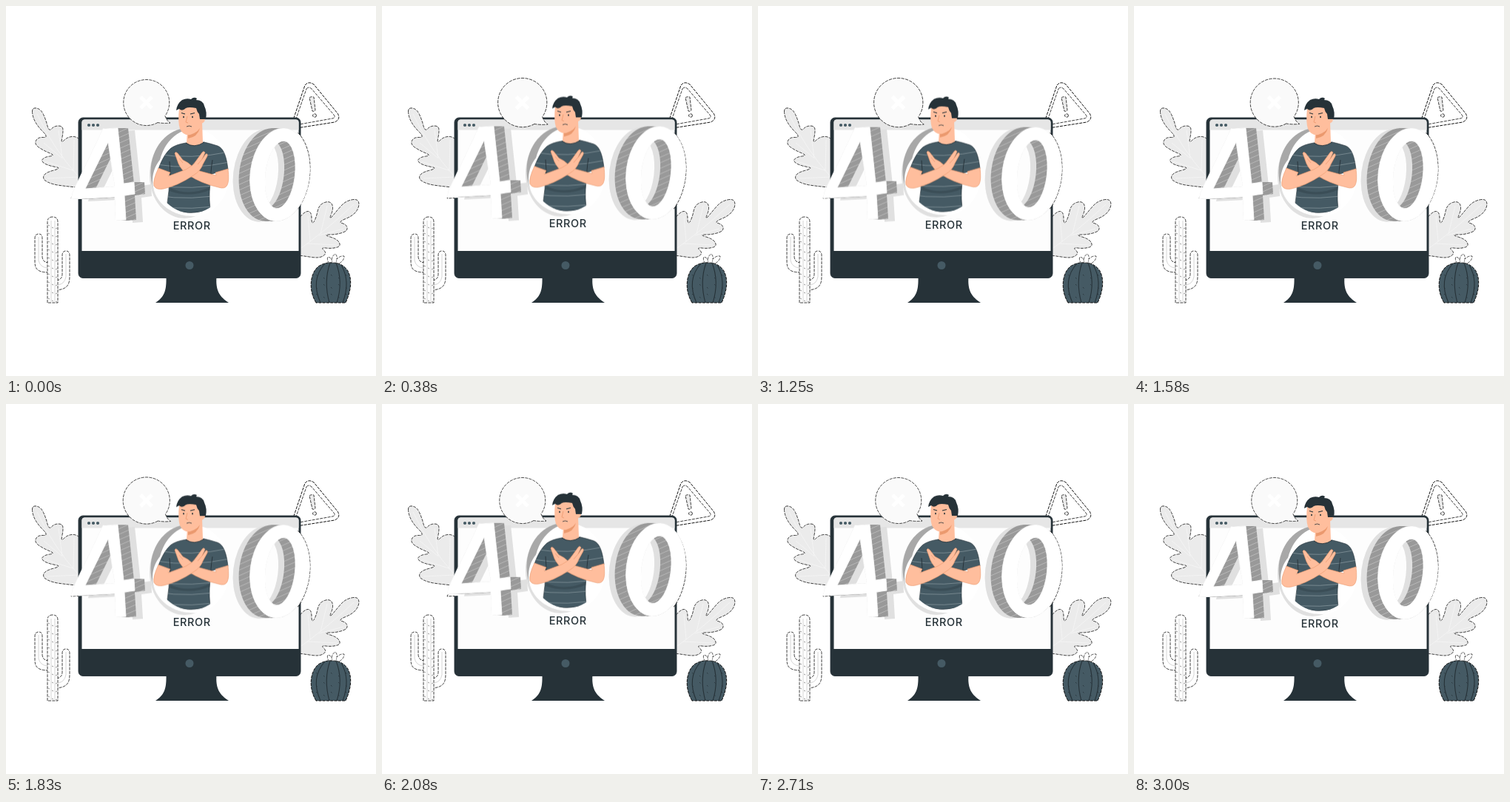
These frames come from a looping animation (500 px wide and 500 px high, 3040 ms). An HTML page with a canvas:

```html
<!DOCTYPE html>
<html lang="en">
<head>
<meta charset="utf-8">
<title>400 Error</title>
<style>
  html, body { margin: 0; width: 100%; height: 100%; overflow: hidden; background: #fff; }
  canvas { display: block; width: 500px; height: 500px; }
</style>
</head>
<body>
<canvas id="stage"></canvas>
<script>
const LOOP = 3040, SIZE = 500;
const DARK = '#263238', SLATE = '#455a64', SKIN = '#ffbe9d', SKIN_EDGE = '#eb996e';
const PALE = '#ebebeb', VEIN = '#f6f6f6', SHADE = '#e0e0e0', WALL = '#999', INK = '#111';
const ratio = Math.max(1, window.devicePixelRatio || 1);

function layer(canvas, scale) {
  canvas.width = canvas.height = SIZE * scale;
  const c = canvas.getContext('2d');
  c.scale(scale, scale);
  c.lineJoin = 'round';
  return c;
}
const ctx = layer(document.getElementById('stage'), ratio);

// Straight polygon from a flat list of coordinates
function poly(p) {
  const path = new Path2D();
  for (let i = 0; i < p.length; i += 2) path.lineTo(p[i], p[i + 1]);
  path.closePath();
  return path;
}

// Smooth closed outline passing near the given points
function blob(p) {
  const path = new Path2D(), n = p.length;
  path.moveTo((p[n - 2] + p[0]) / 2, (p[n - 1] + p[1]) / 2);
  for (let i = 0; i < n; i += 2) {
    const j = (i + 2) % n;
    path.quadraticCurveTo(p[i], p[i + 1], (p[i] + p[j]) / 2, (p[i + 1] + p[j + 1]) / 2);
  }
  path.closePath();
  return path;
}

function oval(x, y, rx, ry, tilt = 0) {
  const path = new Path2D();
  path.ellipse(x, y, rx, ry, tilt, 0, 7);
  return path;
}

// Ink outlines are broken, all other strokes are solid
function paint(c, path, fill, stroke, width = 0.8) {
  if (typeof path === 'string') path = new Path2D(path);
  if (fill) { c.fillStyle = fill; c.fill(path); }
  if (stroke) {
    c.setLineDash(stroke === INK ? [4, 1.3] : []);
    c.strokeStyle = stroke;
    c.lineWidth = width;
    c.stroke(path);
  }
}

function drawLeaves(c) {
  paint(c, blob([35, 137, 47, 139, 54, 154, 58, 170, 65, 162, 77, 162, 77, 173, 74, 186, 83, 177, 95, 176,
    103, 184, 108, 246, 84, 244, 62, 241, 49, 234, 53, 225, 76, 219, 58, 216, 47, 210, 52, 204, 67, 202,
    52, 196, 38, 187, 43, 177, 58, 178, 43, 163, 36, 150]), PALE, INK);
  paint(c, 'M42 146Q63 192 100 233M75 205L51 185M76 206L71 168M90 222L53 210M91 223L92 181M98 231L56 233',
    null, VEIN, 0.7);
  paint(c, blob([390, 294, 404, 277, 413, 278, 413, 296, 419, 287, 423, 268, 438, 263, 443, 273, 436, 290,
    446, 278, 458, 264, 475, 260, 478, 270, 470, 283, 448, 292, 460, 295, 462, 304, 446, 309, 428, 309,
    448, 315, 453, 325, 439, 328, 425, 326, 434, 334, 424, 341, 403, 338, 388, 336]), PALE, INK);
  paint(c, 'M392 332Q432 304 470 268M411 318L408 284M425 308L434 270M423 310L456 301M407 321L447 323',
    null, VEIN, 0.7);
}

function drawWarning(c) {
  paint(c, 'M404 107Q409 101 416 106L448 145Q453 153 444 157L393 165Q385 166 387 157Z', '#fff', INK, 1);
  paint(c, 'M406 112Q409 108 413 112L443 147Q446 151 441 152L396 160Q390 161 391 155Z', '#fff', INK);
  paint(c, 'M410 124Q412 122 416 123L418 141Q416 143 414 142Z', PALE, INK);
  paint(c, oval(417, 148, 2.5, 2.3), PALE, INK);
}

function drawTallCactus(c) {
  paint(c, 'M58 360C42 360 39 355 39 345V314Q39 308 44.500 308Q49 308 49 314V339Q50 347 58 347Z', '#fff', INK);
  paint(c, 'M68 371Q76 370 76 362V337Q76 331 81 331Q86 331 86 337V366C86 379 80 383 68 384Z', '#fff', INK);
  paint(c, 'M56 401V292Q56 285 63 285Q70 285 70 292V401Z', '#fff', INK);
  paint(c, 'M61 290V400M66 290V400M44 312V344Q46 353 56 354M81 335V366Q79 376 70 377', null, '#aaa', 0.5);
  for (let y = 296; y < 398; y += 11)
    paint(c, `M57 ${y}l2 1M67 ${y + 5}l2 -1M62 ${y + 3}l2 1`, null, '#555', 0.6);
}

function drawRoundCactus(c) {
  paint(c, 'M437 348Q433 343 435 339Q439 340 440 343Q441 337 445 335Q448 338 447 342Q452 337 457 338Q457 344 450 348Z',
    '#fff', INK, 0.7);
  paint(c, 'M441 347L440 343M446 347L447 342', null, '#555', 0.6);
  paint(c, 'M419 401C409 385 410 362 422 352Q431 346 441 347Q455 347 462 358C469 371 465 388 459 401Z', SLATE, INK, 1);
  paint(c, 'M431 348Q411 370 425 401M438 347Q429 372 437 401M446 347Q456 373 447 401M453 350Q466 372 455 401',
    null, DARK, 1.1);
  for (let i = 0; i < 15; i++) {
    const x = 419 + (i % 5) * 10, y = 363 + Math.floor(i / 5) * 13 + (i % 2) * 4;
    paint(c, `M${x} ${y}l1.500 1.500`, null, DARK, 0.8);
  }
}

function drawMonitor(c) {
  paint(c, 'M216.500 366C217 385 214 393 202 401H301C289 393 283 385 284.500 366Z', DARK);
  const body = new Path2D();
  body.roundRect(98, 151, 300, 216.500, 6);
  paint(c, body, DARK, DARK, 0.9);
  const screen = new Path2D();
  screen.roundRect(102.500, 153.500, 293, 177.500, [4, 4, 0, 0]);
  paint(c, screen, '#fdfdfd');
  const bar = new Path2D();
  bar.roundRect(102.500, 153.500, 293, 14, [4, 4, 0, 0]);
  paint(c, bar, '#e6e6e6');
  for (const x of [112, 118, 124]) paint(c, oval(x, 161, 2.1, 2.1), SLATE);
  paint(c, oval(248, 350.500, 5.500, 5.500), SLATE);
}

// Parts of the big digits that hang over the bezel
function drawOverhang(c) {
  paint(c, poly([104, 226, 88, 260, 104, 259]), '#fff');
  paint(c, 'M98 238L88 260L98 259.500', null, INK);
  c.save();
  c.beginPath();
  c.rect(394, 150, 30, 160);
  c.clip();
  paint(c, oval(371, 227, 39.500, 64, 0.12), '#fff', INK);
  c.restore();
}

const four = {
  face: poly([131, 166, 151, 165, 159, 240, 173, 238, 174, 254, 160, 256, 162, 289, 148, 290, 147, 258, 88, 261, 90, 252]),
  hole: poly([138, 184, 107, 247, 147, 244]),
  depth: 14, cast: [23, 3]
};
const zero = {
  face: oval(370, 228, 40, 63, 0.12),
  hole: oval(370.500, 228, 20, 46, 0.12),
  depth: -15, cast: [-23, 1]
};
for (const d of [four, zero]) {
  d.ring = new Path2D(d.face);
  d.ring.addPath(d.hole);
}

function drawDigits(c) {
  const walls = document.createElement('canvas');
  const w = layer(walls, 2);
  for (const d of [four, zero]) {
    c.save();
    c.translate(...d.cast);
    c.fillStyle = SHADE;
    c.fill(d.ring, 'evenodd');
    c.restore();
    w.fillStyle = WALL;
    for (let k = 0; k <= 28; k++) {
      w.save();
      w.translate(d.depth * k / 28, 0);
      w.fill(d.ring, 'evenodd');
      w.restore();
    }
  }
  w.globalCompositeOperation = 'source-atop';
  for (let y = 120; y < 520; y += 7.500)
    paint(w, `M80 ${y}L420 ${y - 150}`, null, 'rgba(255,255,255,.35)', 0.7);
  c.drawImage(walls, 0, 0, SIZE, SIZE);
  c.fillStyle = '#fff';
  for (const d of [four, zero]) {
    c.fill(d.ring, 'evenodd');
    paint(c, d.ring, null, '#fff', 0.8);
  }
}

function drawPortal(c) {
  paint(c, oval(243, 227, 49, 60, 0.08), SHADE);
  paint(c, oval(246, 224, 50.500, 59), '#a8a8a8');
  paint(c, oval(254, 225, 48, 59), '#fff');
  // The rim stays white down the lower left
  paint(c, oval(249, 236, 51, 47.500), '#fff');
}

function drawBody(c) {
  const shirt = new Path2D('M243 185Q230 187 223 192C215 199 210 209 206 220L221 226Q221 250 217 273Q246 285 276 275Q273 250 278 227L300 221C298 203 294 192 286 189Q277 186 268 184Z');
  c.save();
  c.clip(oval(250.500, 221, 51, 59));
  paint(c, shirt, SLATE, DARK, 0.6);
  c.clip(shirt);
  for (let y = 199; y < 285; y += 14)
    paint(c, `M203 ${y + 1}Q250 ${y + 9} 302 ${y - 2}`, null, '#8d9ca2', 0.7);
  paint(c, 'M221 210Q223 226 221 240M279 208Q276 226 277 238', null, DARK, 0.9);
  paint(c, 'M222 246Q248 258 277 244L277 248Q249 260 221 250Z', 'rgba(38,50,56,.3)');
  c.restore();
}

function drawArms(c) {
  // Arm reaching to the upper left
  paint(c, 'M300 220Q302 236 299 242Q296 248 287 245Q264 240 246 228Q237 222 233 213L228 199Q229 196 232 199L239 208Q246 211 252 217Q256 221 262 223L284 229L283 225Z',
    SKIN, SKIN_EDGE, 0.6);
  // Arm reaching to the upper right
  paint(c, 'M206 219L222 225L219 230L243 221Q252 217 257 209L265 198Q267 195 269 198L265 207L270 200Q273 199 272 203L266 214Q263 223 253 229Q232 243 213 247Q203 249 200 243Q198 236 206 219Z',
    SKIN, SKIN_EDGE, 0.6);
  paint(c, 'M259 214L265 207M234 206L239 212', null, SKIN_EDGE, 0.7);
}

function drawHead(c) {
  paint(c, 'M245 168L244 185Q254 192 266 185L265 156Z', SKIN);
  paint(c, 'M246 173Q257 173 262 165Q259 177 246 179Z', SKIN_EDGE);
  paint(c, 'M234 138Q232 157 235 166Q240 176 249 174Q260 171 264 158L266 138Q250 128 234 138Z', SKIN);
  paint(c, oval(265, 153, 4, 5.500, 0.2), SKIN);
  paint(c, 'M230 141Q231 132 238 127Q244 124 250 126Q254 122 258 125L257 127Q266 127 268 135Q272 143 270 153L262 153L261 146Q258 143 257 138Q247 136 243 138Q238 143 234 139Z',
    DARK);
  paint(c, 'M237 144.500L242 146M249 146L255 144.500', null, DARK, 1.1);
  paint(c, oval(240, 150, 0.9, 1.3), DARK);
  paint(c, oval(252, 150, 0.9, 1.3), DARK);
  paint(c, 'M245 149L243 157L246 158', null, SKIN_EDGE, 0.8);
  paint(c, 'M244 163Q247.500 161 251 163', null, DARK, 0.8);
  paint(c, 'M243 185Q254 193 268 184', null, DARK, 0.8);
}

function drawLabel(c) {
  c.font = '500 14.5px Inter, sans-serif';
  c.letterSpacing = '0.6px';
  c.textAlign = 'center';
  c.fillStyle = DARK;
  c.fillText('ERROR', 251.3, 302);
}

function drawBubble(c, scale) {
  c.save();
  c.translate(190, 130);
  c.scale(scale, scale);
  paint(c, 'M15 27.500A31 31 0 1 1 25 18.500Q27 25 32 28Q23 29 15 27.500Z', '#fafafa', INK, 0.75);
  paint(c, 'M-8 -7L7 8M7 -7L-8 8', null, '#fff', 5);
  c.restore();
}

function still(...parts) {
  const canvas = document.createElement('canvas');
  const c = layer(canvas, ratio);
  for (const part of parts) part(c);
  return canvas;
}
const scenery = still(drawLeaves, drawWarning, drawTallCactus, drawRoundCactus, drawMonitor, drawOverhang);
const floating = still(drawDigits, drawPortal, drawBody, drawArms, drawHead);

const ease = u => (1 - Math.cos(Math.PI * u)) / 2;

// Two beats, then a rest
function beat(p) {
  if (p < 0.14) return ease(p / 0.14);
  if (p < 0.28) return 1 - ease((p - 0.14) / 0.14);
  if (p < 0.42) return ease((p - 0.28) / 0.14);
  if (p < 0.70) return 1 - ease((p - 0.42) / 0.28);
  return 0;
}

function draw(ms) {
  const p = (ms % LOOP) / LOOP;
  const lift = -2.5 * (1 - Math.cos(4 * Math.PI * p));
  ctx.fillStyle = '#fff';
  ctx.fillRect(0, 0, SIZE, SIZE);
  ctx.drawImage(scenery, 0, 0, SIZE, SIZE);
  ctx.save();
  ctx.translate(0, lift);
  ctx.drawImage(floating, 0, 0, SIZE, SIZE);
  drawLabel(ctx);
  ctx.restore();
  drawBubble(ctx, 1 + 0.07 * beat(p));
}

const start = performance.now();
function tick() {
  draw(performance.now() - start);
  requestAnimationFrame(tick);
}
tick();
</script>
</body>
</html>
```
